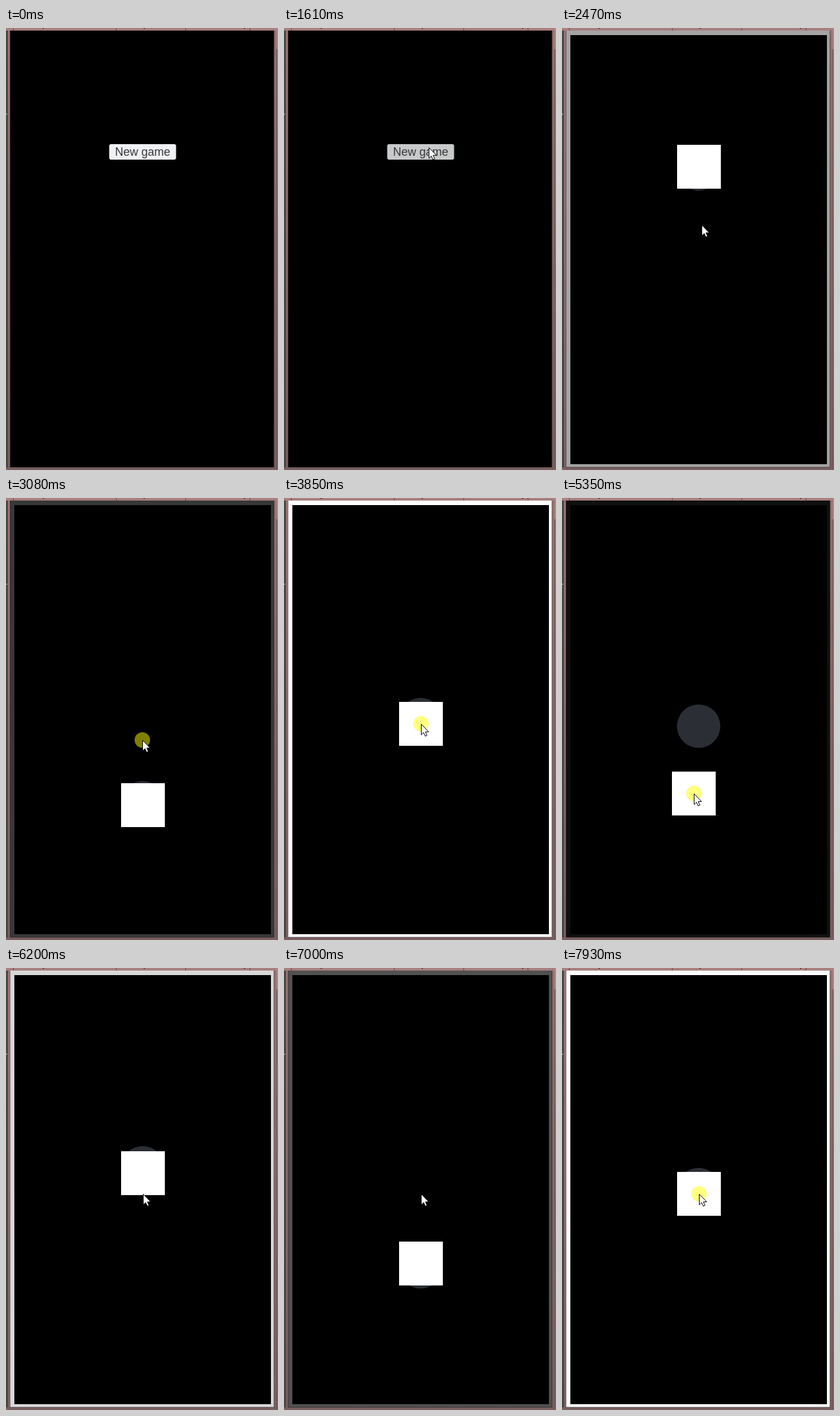
Write an HTML page with a canvas that moves like this. It is 423x685 px and loops after 8000 ms.

```html
<!DOCTYPE html>
<html>
<head>
<meta charset="utf-8">
<style>
html, body { margin: 0; width: 100%; height: 100%; overflow: hidden; background: #000; }
canvas { display: block; }
</style>
</head>
<body>
<canvas width="423" height="685"></canvas>
<script>
const ctx = document.querySelector('canvas').getContext('2d');
const LOOP = 8000, STEP = 78, CURSOR_IN = 120, CLICK = 1365;
const HOME = { x: 212.5, y: 343.5 }, REACH = 136, SIZE = 68;
const FADE = 1470, SWEEP_DELAY = 117, SWEEP = 1314;

// Each round lights the border, then goes; demo and dragged rounds alternate
const rounds = [
  { show: 1675, go: 1935, dim: 0 },
  { show: 3755, go: 3970, dim: 0, drag: true },
  { show: 5795, go: 5980, dim: 80 },
  { show: 7755, go: 7970, dim: 0, drag: true }
];

// Cursor moves, each starting where the last one ended
const moves = [
  { from: CURSOR_IN, to: 822, x: 225, y: 185 },
  { from: 1905, to: 2850, x: 212, y: 375 },
  { from: 3110, to: 3390, x: 213, y: 350 },
  { from: 3980, to: 4585, x: 216, y: 204 },
  { from: 4600, to: 5300, x: 205, y: 458 },
  { from: 5430, to: 5780, x: 213, y: 350 }
];

const clamp = u => Math.max(0, Math.min(1, u));
const ease = u => { u = clamp(u); return u * u * (3 - 2 * u); };

function cursorAt(t) {
  let x = 320, y = 619;
  for (const m of moves) {
    const u = ease((t - m.from) / (m.to - m.from));
    x += (m.x - x) * u;
    y += (m.y - y) * u;
  }
  return [x, y];
}

// One sweep: centre, up, down, centre
function guideY(round, t) {
  const p = (t - round.go - SWEEP_DELAY) / SWEEP;
  return HOME.y + REACH * (2 * ease(2 * p - 0.5) - ease(4 * p) - ease(4 * p - 3));
}

function rect(color, x, y, w, h) {
  ctx.fillStyle = color;
  ctx.fillRect(x, y, w, h);
}

function disc(color, x, y, r) {
  ctx.fillStyle = color;
  ctx.beginPath();
  ctx.arc(x, y, r, 0, 7);
  ctx.fill();
}

function drawWindow() {
  const side = ctx.createLinearGradient(0, 0, 0, 685);
  side.addColorStop(0, '#9c7474');
  side.addColorStop(1, '#7a5f60');
  rect(side, 0, 0, 423, 685);
  rect('#a97f7f', 0, 0, 423, 4);
  for (const x of [11, 171, 279, 379]) rect('#654a4a', x, 0, 1, 4);
  for (const x of [57, 214, 370]) rect('#251b1b', x, 0, 2, 1);
  rect('#484545', 0, 4, 3, 677);
  rect('#c8c8c8', 0, 133, 2, 1);
  rect('#b18686', 421, 0, 2, 33);
  rect('#6c5353', 420, 33, 1, 652);
  rect('#5f4a4a', 6, 4, 411.5, 677.5);
  rect('#000', 6.5, 4, 410, 676.5);
}

function drawMenu(clicked) {
  ctx.fillStyle = clicked ? '#c8c9ca' : '#f0f1f5';
  ctx.beginPath();
  ctx.roundRect(160.5, 180, 104, 24, 3);
  ctx.fill();
  ctx.fillStyle = '#383838';
  ctx.font = '18px "Liberation Sans", Arial, sans-serif';
  ctx.textAlign = 'center';
  ctx.fillText('New game', 212.5, 198);
}

function drawGame(round, t) {
  const g = Math.max(round.dim, Math.round(255 * (1 - clamp((t - round.go) / FADE))));
  rect(`rgb(${g},${g},${g})`, 6.5, 4, 410, 676.5);
  rect('#000', 13, 11, 399, 665);

  disc('#2c2e36', HOME.x, guideY(round, t), 33.7);

  const held = round.drag && t > round.show + 80;
  const [x, y] = held ? cursorAt(t - 30) : [HOME.x, guideY(round, t - 16)];
  rect('#fff', Math.round(x - SIZE / 2), Math.round(y - SIZE / 2), SIZE, SIZE);
}

function drawCursor(t, pressed) {
  const [x, y] = cursorAt(t).map(Math.round);
  if (pressed) disc('rgba(255,255,0,.5)', x, y, 12);
  ctx.save();
  ctx.translate(x + 0.5, y + 0.5);
  const arrow = new Path2D('M0 0V16.5L3.7 13 6.2 18.6 8.9 17.4 6.4 11.9H11.5Z');
  ctx.fillStyle = '#fff';
  ctx.strokeStyle = '#000';
  ctx.fill(arrow);
  ctx.stroke(arrow);
  ctx.restore();
}

function frame(now) {
  // The picture advances in even steps
  const t = CURSOR_IN + STEP * Math.floor((now % LOOP - 98) / STEP);
  const round = rounds.findLast(r => t >= r.show);
  const clicking = [CLICK, 3000].some(c => t >= c && t < c + STEP * 2 - 50);
  drawWindow();
  if (round) drawGame(round, t);
  else drawMenu(t >= CLICK);
  if (t >= CURSOR_IN) drawCursor(t, clicking || round?.drag);
  requestAnimationFrame(frame);
}
requestAnimationFrame(frame);
</script>
</body>
</html>
```
